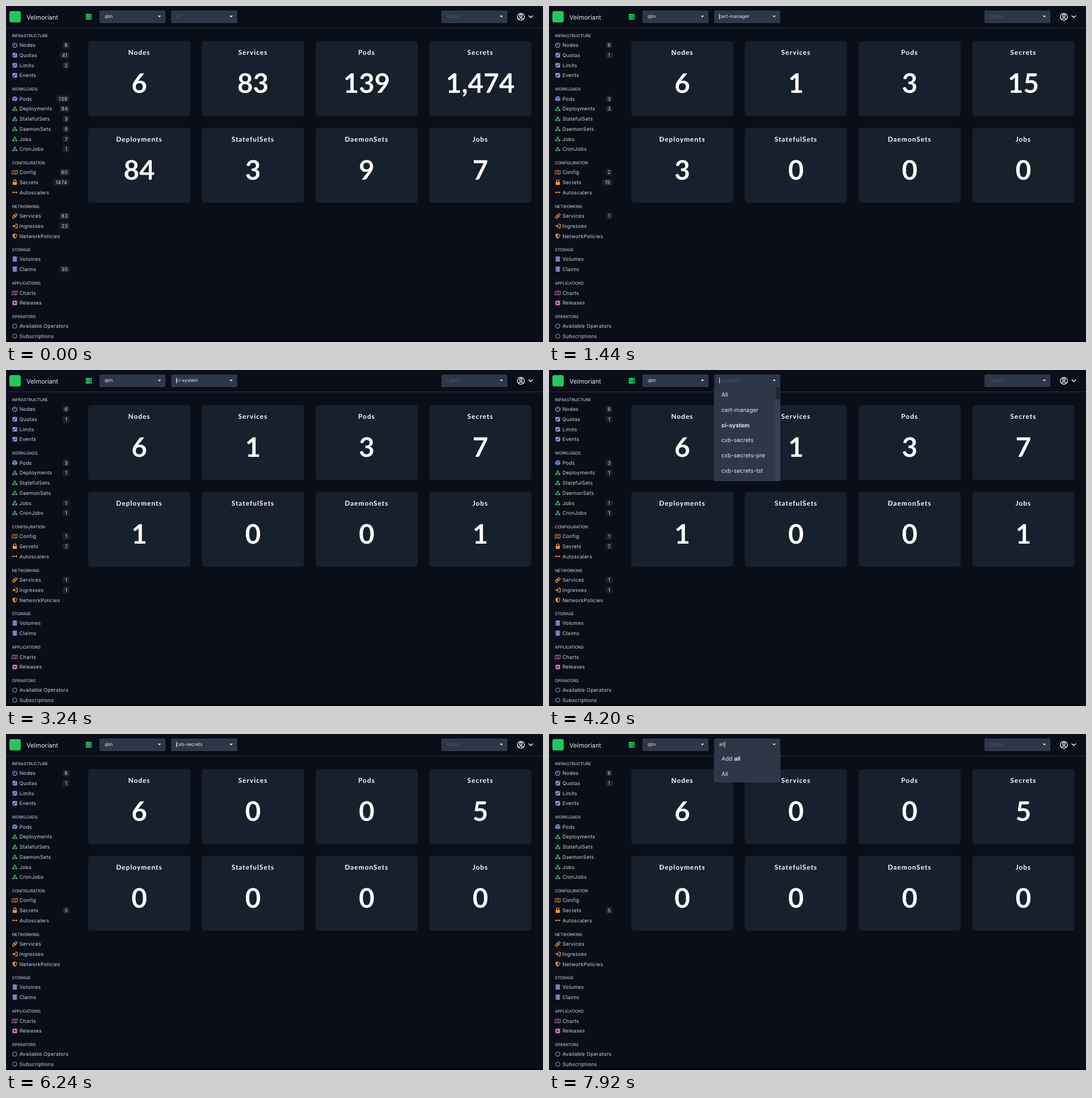
An HTML page that plays this animation: 947x592 px, repeating every 8 s.

```html
<!DOCTYPE html>
<html lang="en">
<head>
<meta charset="utf-8">
<title>Cluster dashboard</title>
<style>
html, body { margin: 0; width: 100%; height: 100%; overflow: hidden; background: #0a0e18; }
svg { display: block; width: 947px; height: 592px; font-family: Inter, sans-serif; text-rendering: geometricPrecision; fill: #e2e8f0; }
.brand { font-size: 11.1px; }
.head { font-size: 7.3px; letter-spacing: -.16px; fill: #cbd5e0; }
.item { font-size: 8.9px; letter-spacing: .25px; fill: #cbd5e0; }
.field { font-size: 8.25px; }
.option { font-size: 10.1px; }
.dim { fill: #4d586a; }
.bold { font-weight: 700; }
.title { font: 700 11.8px Lato, sans-serif; letter-spacing: 1.05px; text-anchor: middle; fill: #fff; }
.count { font: 700 47.5px Lato, sans-serif; text-anchor: middle; fill: #fff; }
</style>
</head>
<body>
<svg viewBox="0 0 947 592"><g id="base"></g><g id="live"></g></svg>
<script>
const BG = '#0a0e18', CARD = '#17202d', FIELD = '#2d3748';
const PURPLE = '#9a90ee', BLUE = '#7d8be8', GREEN = '#48bb78', ORANGE = '#f6923c', PINK = '#d974b4', GRAY = '#a0aec0';
const LOOP = 8000, STEP = 120, SLIDE = 200, BLINK = 500, ROW = 26.7;

const text = (x, y, cls, s) => `<text x="${x}" y="${y}" class="${cls}">${s}</text>`;
const rect = (x, y, w, h, fill, r = 0) => `<rect x="${x}" y="${y}" width="${w}" height="${h}" rx="${r}" fill="${fill}"/>`;
const line = (d, color, w = 1.2) => `<path d="${d}" fill="none" stroke="${color}" stroke-width="${w}" stroke-linecap="round" stroke-linejoin="round"/>`;
const fill = (d, color) => `<path d="${d}" fill="${color}"/>`;

// Icons are centred on 0,0
const hexagon = (x, y, c) => fill(`M${x} ${y - 2.2}l2 .9v2.3l-2 1l-2-1v-2.3z`, c) + line(`M${x - 1.8} ${y - 1}l1.8.8l1.8-.8`, BG, .6);
const icons = {
  power: c => line('M-2.2-3A3.8 3.8 0 1 0 2.2-3M0-4.3V-.3', c, 1.4),
  edit: c => rect(-4, -4, 8, 8, c, 1) + line('M-2 2L2-2M-2.2 2.2l.2-1.4', BG, 1.1),
  cube: c => fill('M0-4.6L4.3-2.9V2.6L0 4.6L-4.3 2.6V-2.9Z', c) + line('M-3.8-2.3L0-.8L3.8-2.3M0-.8V4', BG, .8),
  cubes: c => hexagon(0, -2, c) + hexagon(-2.5, 2.1, c) + hexagon(2.5, 2.1, c),
  map: c => line('M-4.5-2.5L-1.5-3.6L1.5-2.5L4.5-3.6V2.5L1.5 3.6L-1.5 2.5L-4.5 3.6ZM-1.5-3.6V2.5M1.5-2.5V3.6', c, .9),
  lock: c => rect(-3.8, -.8, 7.6, 5.3, c, .9) + line('M-2.2-.8V-2.2A2.2 2.2 0 0 1 2.2-2.2V-.8', c, 1.3),
  arrows: c => line('M-3.5 0H3.5', c, 1.3) + fill('M-4.8 0l2.4-2.2v4.4zM4.8 0l-2.4-2.2v4.4z', c),
  link: c => `<g transform="rotate(-45)" fill="none" stroke="${c}" stroke-width="1.3"><rect x="-5" y="-1.8" width="5.6" height="3.6" rx="1.8"/><rect x="-.6" y="-1.8" width="5.6" height="3.6" rx="1.8"/></g>`,
  enter: c => line('M1.5-3.5H3.3Q4.2-3.5 4.2-2.6V2.6Q4.2 3.5 3.3 3.5H1.5M-4 0H-1', c, 1.4) + fill('M-1.6-3L1.8 0L-1.6 3z', c),
  shield: c => line('M0-4L3.6-2.6Q3.6 2.2 0 4Q-3.6 2.2-3.6-2.6Z', c, 1.1) + fill('M0-4V4Q-3.6 2.2-3.6-2.6Z', c),
  disks: c => [-4.5, -1.4, 1.7].map(y => rect(-4, y, 8, 2.6, c, 1.3)).join(''),
  play: c => rect(-4, -4, 8, 8, c, 1) + fill('M-1.2-2.4L1.8 0L-1.2 2.4z', BG),
  ring: c => `<circle r="3.8" fill="none" stroke="${c}"/>`
};

// [heading, y of first row, [label, icon, colour]...]
const menu = [
  ['INFRASTRUCTURE', 69, ['Nodes', 'power', PURPLE], ['Quotas', 'edit', PURPLE], ['Limits', 'edit', PURPLE], ['Events', 'edit', PURPLE]],
  ['WORKLOADS', 163.5, ['Pods', 'cube', BLUE], ...['Deployments', 'StatefulSets', 'DaemonSets', 'Jobs', 'CronJobs'].map(s => [s, 'cubes', GREEN])],
  ['CONFIGURATION', 293, ['Config', 'map', ORANGE], ['Secrets', 'lock', ORANGE], ['Autoscalers', 'arrows', ORANGE]],
  ['NETWORKING', 370, ['Services', 'link', ORANGE], ['Ingresses', 'enter', ORANGE], ['NetworkPolicies', 'shield', ORANGE]],
  ['STORAGE', 446, ['Volumes', 'disks', PURPLE], ['Claims', 'disks', PURPLE]],
  ['APPLICATIONS', 505.5, ['Charts', 'map', PINK], ['Releases', 'play', PINK]],
  ['OPERATORS', 564, ['Available Operators', 'ring', GRAY], ['Subscriptions', 'ring', GRAY]]
];
const rowY = {};
const cards = ['Nodes', 'Services', 'Pods', 'Secrets', 'Deployments', 'StatefulSets', 'DaemonSets', 'Jobs'];
const cardX = i => 145 + i % 4 * 200.5;
const cardY = i => i < 4 ? 62 : 214.5;

const kinds = ['Nodes', 'Quotas', 'Limits', 'Pods', 'Deployments', 'StatefulSets', 'DaemonSets', 'Jobs', 'CronJobs', 'Config', 'Secrets', 'Services', 'Ingresses', 'Claims'];
const counts = {
  'All': [6, 41, 2, 139, 84, 3, 9, 7, 1, 60, 1474, 83, 23, 30],
  'cert-manager': [6, 1, 0, 3, 3, 0, 0, 0, 0, 2, 15, 1, 0, 0],
  'ci-system': [6, 1, 0, 3, 1, 0, 0, 1, 1, 1, 7, 1, 1, 0],
  'cxb-secrets': [6, 1, 0, 0, 0, 0, 0, 0, 0, 0, 5, 0, 0, 0]
};
const options = ['All', 'cert-manager', 'ci-system', 'cxb-secrets', 'cxb-secrets-pre', 'cxb-secrets-tst'];

const picks = [
  { open: 340, close: 1150, name: 'cert-manager' },
  { open: 2120, close: 2950, name: 'ci-system' },
  { open: 3930, close: 4910, name: 'cxb-secrets' }
];
const TYPING = 7640;

const field = x => rect(x, 8, 116, 22, '#3a4556', 2.5) + rect(x + .6, 8.6, 114.8, 20.8, FIELD, 2)
  + fill(`M${x + 102.8} 17h5.6l-2.8 3z`, '#e2e8f0');

function drawBase() {
  let s = rect(0, 38, 947, 1, '#2a313d') + rect(0, 589, 947, 3, '#04060b');
  s += rect(6, 9, 20, 20, '#22c55e', 3) + text(36, 23.5, 'brand', 'Velmoriant');
  for (const y of [14, 17.6, 21.2]) s += rect(140.5, y, 11, 2.9, '#22c55e', .8) + rect(148, y + 1, 2, .9, BG);
  s += field(165) + text(174, 21.3, 'field', 'qlm') + field(291.5);
  s += field(768) + text(777, 21.3, 'field dim', 'Labels');
  s += '<g fill="none" stroke="#fff" stroke-width="1.3"><circle cx="908" cy="19" r="6.2"/><circle cx="908" cy="17.3" r="2.3"/><path d="M904 23.6Q905 21.3 908 21.3T912 23.6"/></g>';
  s += line('M922 17.3l3.4 3.3l3.4-3.3', '#fff', 1.4);
  for (const [head, top, ...rows] of menu) {
    s += text(10.5, top - 14.2, 'head', head);
    rows.forEach(([label, icon, color], i) => {
      const y = rowY[label] = top + i * 17.7;
      s += `<g transform="translate(15.5 ${y})">${icons[icon](color)}</g>` + text(23.7, y + 3.2, 'item', label);
    });
  }
  cards.forEach((label, i) => {
    s += rect(cardX(i), cardY(i), 180, 132, CARD, 5) + text(cardX(i) + 90, cardY(i) + 24.2, 'title', label);
  });
  return s;
}

function drawCounts(values) {
  let s = '';
  kinds.forEach((kind, i) => {
    const n = values[i], y = rowY[kind], card = cards.indexOf(kind);
    if (n) {
      const w = String(n).length * 5.6 + 6.5;
      s += rect(112 - w, y - 6, w, 12, '#19212e', 3);
      s += `<text x="${112.2 - w / 2}" y="${y + 3.2}" class="item" text-anchor="middle">${n}</text>`;
    }
    if (card >= 0) s += text(cardX(card) + 90, cardY(card) + 91, 'count', n.toLocaleString('en-US'));
  });
  return s;
}

function drawList(rows, shown, scroll) {
  const h = rows.length * ROW + 5.5 - (scroll ? 0 : 4);
  let s = rect(291, 30, 117, h, '#3a4556', 2) + rect(291.6, 29, 115.8, h + .4, FIELD, 2);
  if (scroll) s += rect(399, 30, 8.4, h - .8, '#364152') + rect(399.8, 30, 7.4, 22, '#1c2532', 1);
  rows.forEach((row, i) => s += text(304, 47.2 + i * ROW, 'option', row));
  return `<g opacity="${shown}" transform="translate(0 ${30 * (1 - shown)}) scale(1 ${shown})">${s}</g>`;
}

function drawLive(t) {
  const clamp = v => Math.max(0, Math.min(1, v));
  const past = picks.filter(p => t >= p.close);
  const name = past.length ? past[past.length - 1].name : 'All';
  const pick = picks.find(p => t >= p.open && t < p.close + SLIDE);
  const typed = t < TYPING ? '' : 'all'.slice(0, 1 + Math.floor((t - TYPING) / STEP));
  const start = Math.max(...picks.flatMap(p => [p.open, p.close]).filter(e => e <= t));
  const caret = typed || (t >= picks[0].open && Math.floor((t - start) / BLINK) % 2 === 0);
  const dim = !typed && (name === 'All' || pick && t < pick.close);

  let s = drawCounts(counts[name]) + text(300, 21.3, dim ? 'field dim' : 'field', typed || name);
  if (caret) s += rect(typed ? 303.3 + 2.1 * typed.length : 300.2, 13.5, .9, 10, '#fff');
  if (typed) {
    const found = options.filter(o => o.toLowerCase().includes(typed));
    s += drawList([`Add <tspan class="bold">${typed}</tspan>`, ...found], clamp((t - TYPING) / SLIDE), false);
  } else if (pick) {
    const shown = t < pick.close ? clamp((t - pick.open) / SLIDE) : 1 - clamp((t - pick.close) / SLIDE);
    s += drawList(options.map(o => o === name ? `<tspan class="bold">${o}</tspan>` : o), shown, true);
  }
  return s;
}

const base = document.getElementById('base'), live = document.getElementById('live');
base.innerHTML = drawBase();
let last = -1;
function tick() {
  const t = Math.floor(performance.now() % LOOP / STEP) * STEP;
  if (t !== last) live.innerHTML = drawLive(last = t);
  requestAnimationFrame(tick);
}
tick();
</script>
</body>
</html>
```
